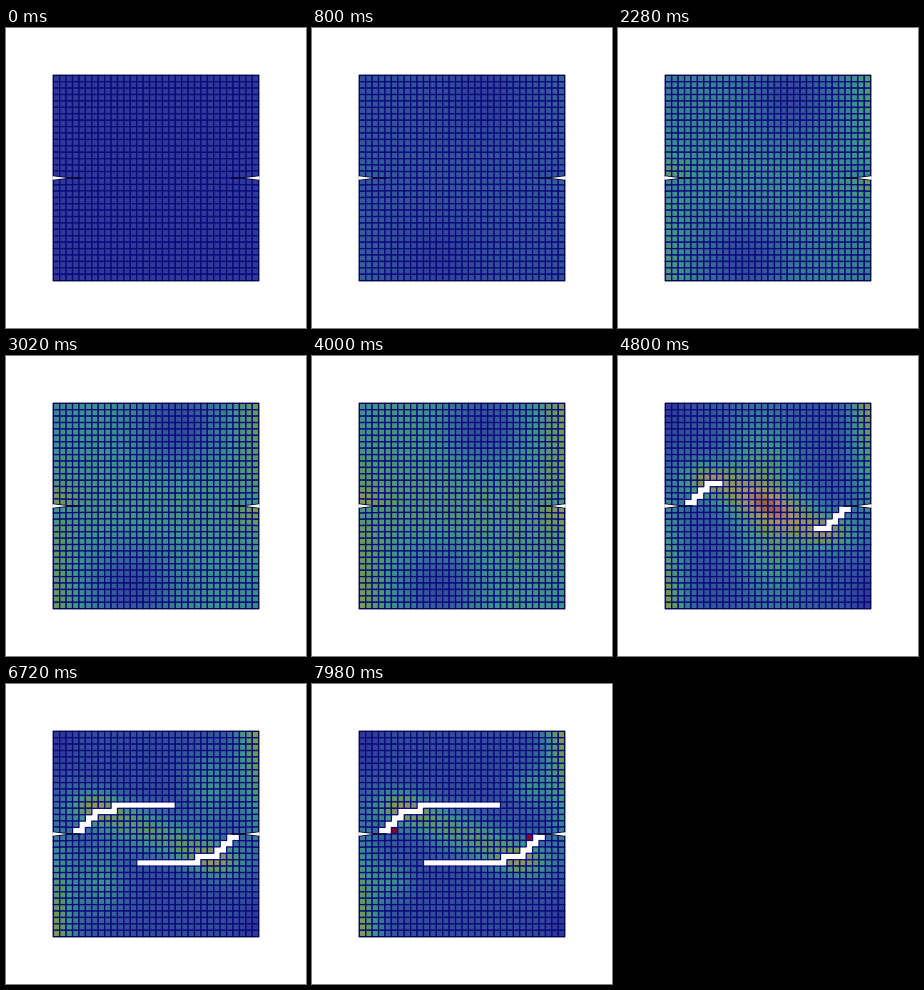
These frames come from a looping animation (300x300 px, 8 s). A matplotlib script:

```python
import numpy as np
import matplotlib.pyplot as plt
from matplotlib.animation import FuncAnimation
from matplotlib.collections import PolyCollection
from matplotlib.colors import LinearSegmentedColormap

SIZE, DPI = 300, 100
FRAMES, STEP = 400, 20
PX = 72 / DPI
N, HALF, MID = 32, 102.7, 150
START, DECAY, LIMIT = 4.0, 1.92, 26.9  # crack onset, slowdown (s), final cells
NAVY, INK = "#09097c", "#050538"

stress_map = LinearSegmentedColormap.from_list(
    "stress", ["#2f3a98", "#36619c", "#3c938c", "#6c985c", "#ac9264", "#850028"])


def make_mesh():
    """Cell corners in pixels; rows open slightly towards the notches."""
    line = np.linspace(-1, 1, N + 1)
    x, y = np.meshgrid(line, line)
    y = y + np.sign(y) * 0.01 * np.exp(-np.abs(y) / 0.2) * (1 - np.abs(y)) * x**6
    p = MID + HALF * np.stack([x, y], -1)
    quads = np.stack([p[:-1, :-1], p[:-1, 1:], p[1:, 1:], p[1:, :-1]], 2)
    return quads.reshape(-1, 4, 2)


def make_crack():
    """Order in which cells are lost: a staircase, then a straight run."""
    order = np.full((N, N), np.inf)
    n = 0
    for k, (first, last) in enumerate(zip([3, 4, 5, 6, 9], [4, 5, 6, 9, 21])):
        row = N // 2 - 1 - k
        for col in range(first, last + 1):
            n += 1
            order[row, col] = order[N - 1 - row, N - 1 - col] = n
    return order.ravel()


def bell(d, width):
    return np.exp(-(d / width) ** 2)


def pair(x, y, rx, ry):
    """A bump and its copy turned half a circle about the centre."""
    return (bell(U - x, rx) * bell(V - y, ry)
            + bell(U + x, rx) * bell(V + y, ry))


def smooth(a, b, t):
    s = np.clip((t - a) / (b - a), 0, 1)
    return s * s * (3 - 2 * s)


quads = make_mesh()
U, V = ((quads.mean(axis=1) - MID) / HALF).T
order = make_crack()

rim = bell(1 - np.abs(U), 0.22)
notch = rim * bell(V, 0.15) * np.tanh(U * V / 0.04)
intact = (0.44 + rim * (0.08 - 0.14 * U * V) + 0.2 * notch
          + 0.06 * bell(V, 0.35) - 0.33 * pair(0.22, -0.8, 0.38, 0.4))

ligament = bell(V - 0.4 * U, 0.22) * np.exp(-(U / 0.75) ** 4)
broken = (0.1 + rim * (0.2 - 0.4 * U * V) + 0.42 * ligament
          + 0.35 * pair(-0.6, -0.25, 0.24, 0.14))
hot = pair(-0.66, -0.03, 0.04, 0.04)


def stress(t, n):
    before = intact * np.sin(np.pi / 2 * min(t / 4.2, 1))
    slow = smooth(5, 8, t)
    tip = 2 * n / N - 1
    ahead = pair(tip + 0.38 - 0.2 * slow, -0.45,
                 0.36 - 0.18 * slow, 0.6 - 0.4 * slow)
    after = broken + (0.36 - 0.1 * slow) * ahead + 0.8 * hot * smooth(6.8, 8, t)
    mix = smooth(START, START + 1, t)
    return np.clip(before + (after - before) * mix, 0, 1)


def stroke(x, y, width):
    ax.plot(x, y, color=INK, lw=width * PX, snap=False, zorder=4)


fig = plt.figure(figsize=(SIZE / DPI, SIZE / DPI), dpi=DPI, facecolor="white")
ax = fig.add_axes([0, 0, 1, 1])
ax.set(xlim=(0, SIZE), ylim=(SIZE, 0))
ax.axis("off")

mesh = PolyCollection(quads, linewidths=1.3 * PX, joinstyle="round", snap=False)
ax.add_collection(mesh)

for side in (-1, 1):
    edge, tip, end = MID + side * np.array([HALF, 89, 76])
    stroke([MID - HALF, MID + HALF], [edge, edge], 0.8)
    stroke([edge, edge], [MID - HALF, MID + HALF], 0.8)
    stroke([tip, end], [MID, MID], 1.5)
    for s in (-1, 1):
        stroke([edge, tip], [MID + s * 2, MID + s * 0.4], 1.1)
    ax.fill([edge + side, tip, edge + side], [MID - 1.8, MID, MID + 1.8],
            fc="white", ec="none", snap=False, zorder=5)


def draw(i):
    t = i * STEP / 1000
    n = LIMIT * (1 - np.exp(-max(t - START, 0) / DECAY))
    kept = np.where(order <= n, 0.0, 1.0)
    faces = stress_map(stress(t, n))
    faces[:, 3] = kept
    mesh.set_facecolor(faces)
    mesh.set_edgecolor([(NAVY, a) for a in kept])
    return [mesh]


anim = FuncAnimation(fig, draw, frames=FRAMES, interval=STEP,
                     repeat=True, repeat_delay=0, blit=False)
plt.show()
```
